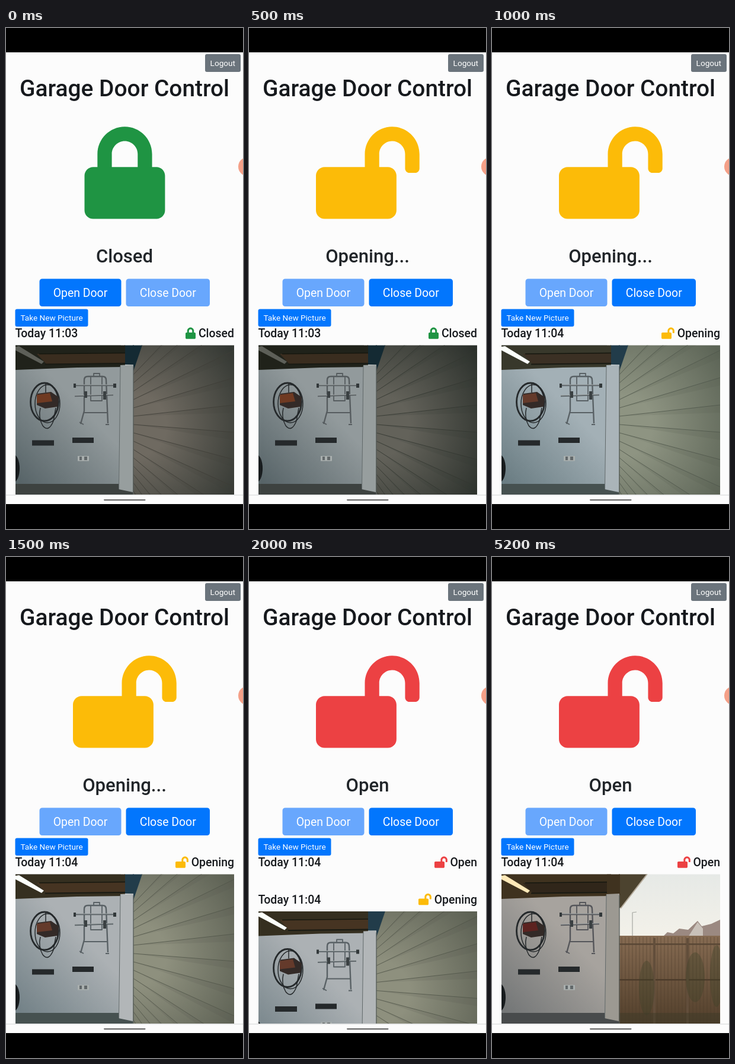
An HTML page that plays this animation: 400x844 px, repeating every 7 s.

```html
<!DOCTYPE html>
<html lang="en">
<head>
<meta charset="utf-8">
<title>Garage Door Control</title>
<style>
html, body { margin: 0; width: 100%; height: 100%; overflow: hidden; background: #000; }
svg { display: block; width: 100%; height: 100%; }
text { font-family: Roboto, sans-serif; }
.head { font-weight: 450; fill: #16191d; }
.status { fill: #212529; }
.white { fill: #fff; }
</style>
</head>
<body>
<svg id="stage" viewBox="0 0 400 844">
  <defs>
    <clipPath id="photoClip"><rect x="16" y="534.5" width="369" height="277"/></clipPath>
    <clipPath id="pageClip"><rect y="41" width="400" height="745"/></clipPath>
  </defs>
  <rect width="400" height="844" fill="#000"/>
  <rect y="41" width="400" height="761" fill="#fcfcfc"/>
  <rect x="336" y="44" width="60" height="30" rx="3" fill="#6b747c"/>
  <text class="white" x="365.8" y="64" font-size="13.6" text-anchor="middle">Logout</text>
  <text class="head" x="200" y="115" font-size="38.83" text-anchor="middle">Garage Door Control</text>
  <g id="state"></g>
  <rect x="15.5" y="473.5" width="123" height="29.5" rx="3" fill="#0276fd"/>
  <text class="white" x="77" y="493.2" font-size="13.6" text-anchor="middle">Take New Picture</text>
  <g id="log" clip-path="url(#pageClip)"></g>
  <circle cx="407.8" cy="233.5" r="15.8" fill="#f4a088"/>
  <rect y="786" width="400" height="1.6" fill="#e3e4e5"/>
  <rect x="165" y="794" width="70.5" height="2.2" rx="1.1" fill="#6c6c6c"/>
</svg>
<script>
const GREEN = '#1f9443', AMBER = '#fcbb08', RED = '#ec4143';
const LOCK = 'M400 224h-24v-72C376 68.2 307.8 0 224 0S72 68.2 72 152v72H48c-26.5 0-48 21.5-48 48v192c0 26.5 21.5 48 48 48h352c26.5 0 48-21.5 48-48V272c0-26.5-21.5-48-48-48zm-104 0H152v-72c0-39.7 32.3-72 72-72s72 32.3 72 72z';
const UNLOCK = 'M423.5 0C339.5.3 272 69.5 272 153.5V224H48c-26.5 0-48 21.5-48 48v192c0 26.5 21.5 48 48 48h352c26.5 0 48-21.5 48-48V272c0-26.5-21.5-48-48-48h-48v-71.1c0-39.6 31.7-72.5 71.3-72.9 40-.4 72.7 32.1 72.7 72v80c0 13.3 10.7 24 24 24h32c13.3 0 24-10.7 24-24v-80C576 68 507.5-.3 423.5 0z';

// Light conditions of the garage picture
const dim = {
  wall: ['#929a9c', '#536064'], ceil: '#20221a', beam: '#3a2d1f', gap: '#142a33', tube: '#5d5f58',
  pillar: '#979e9e', floor: '#3d4240', door: ['#6f6a61', '#343833'], slat: '#3f3e38',
  reel: '#6f3a22', rack: '#565c5f'
};
const dimmer = { ...dim, door: ['#63625a', '#2c312c'], slat: '#343731' };
const lit = {
  wall: ['#a3b0b6', '#66797f'], ceil: '#38382b', beam: '#3b3024', gap: '#223c4a', tube: '#fbfffb',
  pillar: '#aab4b9', floor: '#465150', door: ['#8e9482', '#5c6456'], slat: '#4f574b',
  reel: '#643a2b', rack: '#596165'
};
const bright = { ...lit,
  wall: ['#acb1b4', '#6f7e84'], ceil: '#352f20', beam: '#463422', pillar: '#b2b6b8',
  door: ['#8e907e', '#5d6154'], slat: '#505549'
};
const day = {
  wall: ['#a7a39e', '#707374'], ceil: '#3f321f', beam: '#30261a', tube: '#ffe9b8',
  pillar: '#9c9992', floor: '#484b4c', reel: '#5c2320', rack: '#55565a', outside: true
};

const closed = { label: 'Closed', color: GREEN };
const opening = { label: 'Opening', color: AMBER, open: true };
const opened = { label: 'Open', color: RED, open: true };
const scenes = [
  { at: 0, now: closed, log: [['11:03', closed, dim]] },
  { at: 500, now: opening, log: [['11:03', closed, dimmer]] },
  { at: 1000, now: opening, log: [['11:04', opening, lit]] },
  { at: 1500, now: opening, log: [['11:04', opening, bright]] },
  { at: 2000, now: opened, log: [['11:04', opened, null], ['11:04', opening, bright]] },
  { at: 2500, now: opened, log: [['11:04', opened, day]] }
];
const LOOP = 7000;

const poly = (pts, fill, extra = '') => `<polygon points="${pts}" fill="${fill}" ${extra}/>`;
const rect = (x, y, w, h, fill, extra = '') =>
  `<rect x="${x}" y="${y}" width="${w}" height="${h}" fill="${fill}" ${extra}/>`;
const line = (d, color, width, extra = '') =>
  `<path d="${d}" fill="none" stroke="${color}" stroke-width="${width}" stroke-linejoin="round" ${extra}/>`;
const icon = (s, x, y, size) =>
  `<path d="${s.open ? UNLOCK : LOCK}" fill="${s.color}" transform="translate(${x} ${y}) scale(${size / 512})"/>`;

function button(x, w, label, off) {
  return rect(x, 422.5, w, 46.5, off ? '#68a7fd' : '#0276fd', 'rx="4.6"') +
    `<text class="white" x="${x + w / 2}" y="452.6" font-size="19.42" text-anchor="middle">${label}</text>`;
}

function state(s) {
  const text = s.label + (s === opening ? '...' : '');
  return icon(s, s.open ? 113 : 132.5, 166.3, 155.3) +
    `<text class="head status" x="200" y="394.8" font-size="31.07" text-anchor="middle">${text}</text>` +
    button(56.5, 138, 'Open Door', s.open) + button(202.5, 141.5, 'Close Door', !s.open);
}

function shutter(p) {
  let out = `<radialGradient id="door" gradientUnits="userSpaceOnUse" cx="220" cy="670" r="205">
    <stop offset="0" stop-color="${p.door[0]}"/><stop offset=".25" stop-color="${p.door[0]}"/>
    <stop offset="1" stop-color="${p.door[1]}"/></radialGradient>` +
    poly('214,812 214,575 229,534 385,534 385,812', 'url(#door)');
  for (let k = -6; k < 9; k++) {
    const a = 668 + k * 14, b = 681 + k * 46;
    out += line(`M215 ${a}L385 ${b}`, p.slat, 1, 'opacity=".8"') +
      poly(`215,${a} 385,${b} 385,${b + 13}`, p.slat, 'opacity=".15"');
  }
  return out + rect(200, 534, 16, 33, p.gap) + poly('214,534 230,534 215,578', p.gap);
}

function yard() {
  let out = `<linearGradient id="sky" x2="0" y2="1"><stop stop-color="#e6e9e6"/>
    <stop offset="1" stop-color="#f3f1e9"/></linearGradient>
    <linearGradient id="fence" x2="0" y2="1"><stop stop-color="#866b52"/>
    <stop offset=".85" stop-color="#523f2b"/></linearGradient>` +
    rect(214, 534, 171, 106, 'url(#sky)') +
    poly('288,640 296,632 306,634 316,626 331,628 347,613 354,622 370,618 385,611 385,642', '#9b8981') +
    poly('331,640 347,615 356,626 356,640', '#c9c1b9') +
    line('M237 638V599L244 598', '#a5a7a2', 1.2) +
    rect(214, 638, 171, 174, 'url(#fence)');
  for (let x = 219; x < 385; x += 6) out += line(`M${x} 640V812`, '#4b3a2a', .7, 'opacity=".7"');
  out += rect(214, 651, 171, 2.5, '#594735') + rect(214, 711, 171, 2.5, '#4c3b2a');
  for (const x of [272, 328]) out += rect(x, 642, 4, 150, '#624e3b');
  for (const [x, y, rx, ry] of [[261, 726, 13, 46], [343, 708, 16, 42], [379, 706, 11, 52]])
    out += `<ellipse cx="${x}" cy="${y}" rx="${rx}" ry="${ry}" fill="#3b4026" opacity=".35"/>`;
  return out + rect(214, 768, 171, 44, '#3f3b29', 'opacity=".5"') +
    poly('214,534 262,534 218,590 214,592', '#4c432f') + line('M262 534L217 592', '#b3a999', 2);
}

function garage(p) {
  const hose = '#25292b';
  return `<linearGradient id="wall" x1=".8" y1=".1" x2=".2" y2="1"><stop stop-color="${p.wall[0]}"/>
    <stop offset=".3" stop-color="${p.wall[0]}"/><stop offset="1" stop-color="${p.wall[1]}"/></linearGradient>` +
    (p.outside ? yard() : shutter(p)) +
    rect(16, 534, 178, 278, 'url(#wall)') +
    poly('16,534 201,534 201,571 120,572 16,576', p.ceil) +
    poly('52,549 201,547 201,564 68,566', p.beam) +
    line('M56 549L201 547.5', '#15170f', 1.5) + line('M66 566.5L201 565', '#191a13', 2) +
    (p.outside ? rect(194, 534, 22, 35, p.ceil) : '') +
    poly('16,537 22,536 64,562 60,566 16,543', p.tube) +
    poly('193,568 215,567 214,812 190,812', p.pillar) +
    line('M193 569L190.5 780', '#606869', 1) + line('M215 570V812', '#555c5a', 1.3) +
    poly('16,768 190,768 190,777 214,782 214,812 16,812', p.floor) +
    `<ellipse cx="13" cy="742" rx="10" ry="23" fill="#171b1d"/>` +
    // Hose on its reel
    `<ellipse cx="65" cy="630" rx="23.5" ry="32" fill="none" stroke="${hose}" stroke-width="2.8"/>
    <ellipse cx="70" cy="633" rx="21" ry="32" fill="none" stroke="${hose}" stroke-width="1.5"/>` +
    line('M67 599V614M58 640Q54 656 62 670Q72 682 80 662L84 640', hose, 1.5) +
    poly('53,616 76,613 89,622 87,638 66,641 52,635', '#332a27') +
    poly('52,618 74,615 78,629 52,632', p.reel) +
    // Wall rack
    line('M126 667L132 645V593Q132 587 138 587H163Q169 587 169 593L172 666', p.rack, 2.4) +
    line('M148 587V582H158V587M143 588V628H162V588M132 648H172M124 664L131 668M168 668H174', p.rack, 1.8) +
    line('M114 602H186M116 620L181 618', p.rack, 2.6) +
    line('M114 601H186M116 619L181 617', '#b4baba', .8) +
    rect(114, 599, 4, 7, '#32383a') + rect(181, 599, 5, 7, '#32383a') +
    rect(132, 612, 5, 11, '#3a4042') + rect(164, 612, 5, 14, '#3a4042') +
    rect(44, 694.5, 37, 9, '#25292b') + rect(112, 690, 36, 9, '#25292b') +
    rect(121, 721, 19, 8.5, '#a9afae') + rect(124, 722, 4, 6, '#62686a') + rect(132, 722, 5, 6, '#62686a');
}

const iconX = { Closed: 303, Opening: 286, Open: 313 };
function entry([time, s, photo], i) {
  return `<g transform="translate(0 ${i * 62.5})">
    <text class="head" x="15.5" y="521.4" font-size="19.42">Today ${time}</text>
    <text class="head" x="385" y="521.4" font-size="19.42" text-anchor="end">${s.label}</text>` +
    icon(s, iconX[s.label], 504.4, 19.42) +
    (photo ? `<g clip-path="url(#photoClip)">${garage(photo)}</g>` : '') + '</g>';
}

const stateBox = document.getElementById('state'), logBox = document.getElementById('log');
let shown;
function draw(ms) {
  const t = ms % LOOP;
  const scene = scenes.filter(s => s.at <= t).pop();
  if (scene !== shown) {
    shown = scene;
    stateBox.innerHTML = state(scene.now);
    logBox.innerHTML = scene.log.map(entry).join('');
  }
}
function tick() {
  draw(performance.now());
  requestAnimationFrame(tick);
}
tick();
</script>
</body>
</html>
```
